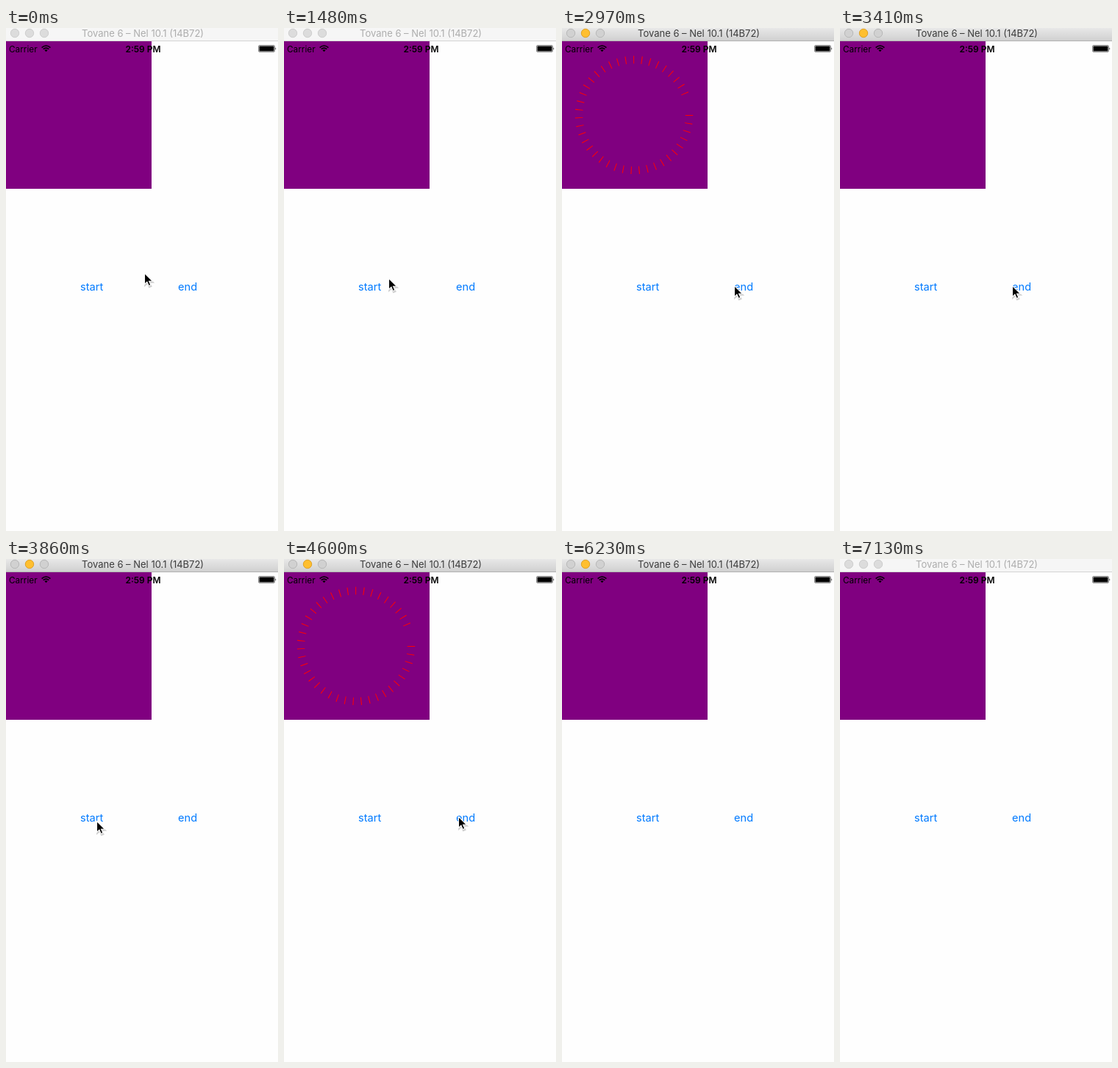
Recreate the animation shown at these times as an HTML page. Size 370 px wide and 682 px high, loop 7230 ms.

```html
<!DOCTYPE html>
<html lang="en">
<head>
<meta charset="utf-8">
<title>Dashed dial</title>
<style>
  html, body { margin: 0; width: 100%; height: 100%; overflow: hidden; background: #fefefe; }
  svg { display: block; width: 370px; height: 682px; font-family: Inter, Roboto, sans-serif; }
  .button { font-size: 14.6px; fill: #007aff; }
  #bar { fill: #f6f6f6; }
  #edge { fill: #d3d3d3; }
  #title { fill: #adadad; font-size: 13px; }
  #lights { fill: #dcdcdc; stroke: #cecece; }
  .active #bar { fill: url(#chrome); }
  .active #edge { fill: #b1b1b1; }
  .active #title { fill: #3c3c3c; }
  .active #lights { fill: #d1d1d1; stroke: #b8b8b8; }
  .active #amber { fill: #ffbf2f; stroke: #dfa226; }
</style>
</head>
<body>
<svg id="stage" viewBox="0 0 370 682">
  <defs>
    <linearGradient id="chrome" x2="0" y2="1">
      <stop stop-color="#e8e8e8"/>
      <stop offset="1" stop-color="#d0d0d0"/>
    </linearGradient>
    <path id="arrow" d="M.5 .5V15.3L3.9 12.2L6.3 17.6L8.9 16.5L6.6 11.2H11.2Z"/>
  </defs>

  <rect y="18" width="198" height="200" fill="#800080"/>
  <circle id="dial" cx="98" cy="118" r="75" fill="none" stroke="#f00" stroke-width="10.4"/>

  <rect id="bar" width="370" height="17"/>
  <rect id="edge" y="17" width="370" height="1"/>
  <g id="lights">
    <circle cx="12" cy="7" r="5.7"/>
    <circle id="amber" cx="32" cy="7" r="5.7"/>
    <circle cx="52" cy="7" r="5.7"/>
  </g>
  <text id="title" x="103" y="12">Tovane 6 – Nel 10.1 (14B72)</text>

  <text x="4" y="32.5" font-size="11.8">Carrier</text>
  <g fill="none" stroke="#000" stroke-width="1.6">
    <path d="M48.6 26.6Q54.5 21.4 60.4 26.6M50.7 28.7Q54.5 25.4 58.3 28.7"/>
    <path d="M52.4 30L54.5 32.2L56.6 30Q54.5 28.4 52.4 30Z" fill="#000" stroke="none"/>
  </g>
  <text x="186.5" y="32.5" font-size="12" font-weight="600" text-anchor="middle">2:59 PM</text>
  <rect x="343.5" y="23.5" width="22" height="9" rx="1.5" fill="none" stroke="#000" stroke-opacity=".45"/>
  <rect x="344.5" y="24.5" width="20" height="7" rx=".5"/>
  <path d="M366.5 26.3Q368.2 28 366.5 29.8Z"/>

  <text id="start" class="button" x="101" y="356">start</text>
  <text id="end" class="button" x="234" y="356">end</text>

  <g id="cursor">
    <use href="#arrow" x=".6" y="1.6" stroke="#000" stroke-width="2" opacity=".18"/>
    <use href="#arrow" stroke="#fff" stroke-width="1.1"/>
  </g>
</svg>
<script>
const LOOP = 7230, STEP = 145, TICKS = 41;
const presses = [
  { at: 2060, id: "start" }, { at: 3120, id: "end" },
  { at: 4010, id: "start" }, { at: 5040, id: "end" }
];
const home = { x: 188, y: 332 };
// Pointer glides: start time, number of steps, goal and downward bow.
const glides = [
  { at: 1190, steps: 5, x: 117, y: 352, bow: -6 },
  { at: 2680, steps: 3, x: 234, y: 349, bow: 10 },
  { at: 3560, steps: 3, x: 123, y: 355, bow: 8 },
  { at: 4300, steps: 3, x: 237, y: 349, bow: 10 },
  { at: 4740, steps: 2, x: 244, y: 352, bow: 0 },
  { at: 5940, steps: 1, x: 208, y: 470, bow: 0 },
  { at: 6080, steps: 2, x: 264, y: 850, bow: 0 }
];

const el = id => document.getElementById(id);
const mix = (a, b, k) => a + (b - a) * k;
const ease = u => u * u * (3 - 2 * u);
const stepsSince = (t, at) => Math.floor((t - at) / STEP);

function pointerAt(t) {
  let from = home, pos = home;
  for (const g of glides.filter(g => g.at <= t)) {
    const u = Math.min(1, (stepsSince(t, g.at) + 1) / g.steps);
    pos = {
      x: mix(from.x, g.x, ease(u)),
      y: mix(from.y, g.y, ease(u)) + g.bow * Math.sin(Math.PI * u)
    };
    from = g;
  }
  return pos;
}

function draw(now) {
  const t = now % LOOP;
  el("stage").classList.toggle("active", t >= 2060 && t < 7130);

  let count = 0;
  const ink = { start: 1, end: 1 };
  for (const p of presses.filter(p => p.at <= t)) {
    const n = stepsSince(t, p.at);
    const k = ease(Math.min(1, (n * STEP + 112) / 250));
    count = Math.ceil(TICKS * (p.id == "start" ? k : 1 - k));
    ink[p.id] = Math.min(1, .4 + .3 * n);
  }
  el("dial").setAttribute("stroke-dasharray", "1 10 ".repeat(count) + "0 999");
  for (const id in ink) el(id).style.opacity = ink[id];

  const { x, y } = pointerAt(t);
  el("cursor").setAttribute("transform", `translate(${Math.round(x)} ${Math.round(y)})`);
  requestAnimationFrame(draw);
}
requestAnimationFrame(draw);
</script>
</body>
</html>
```
